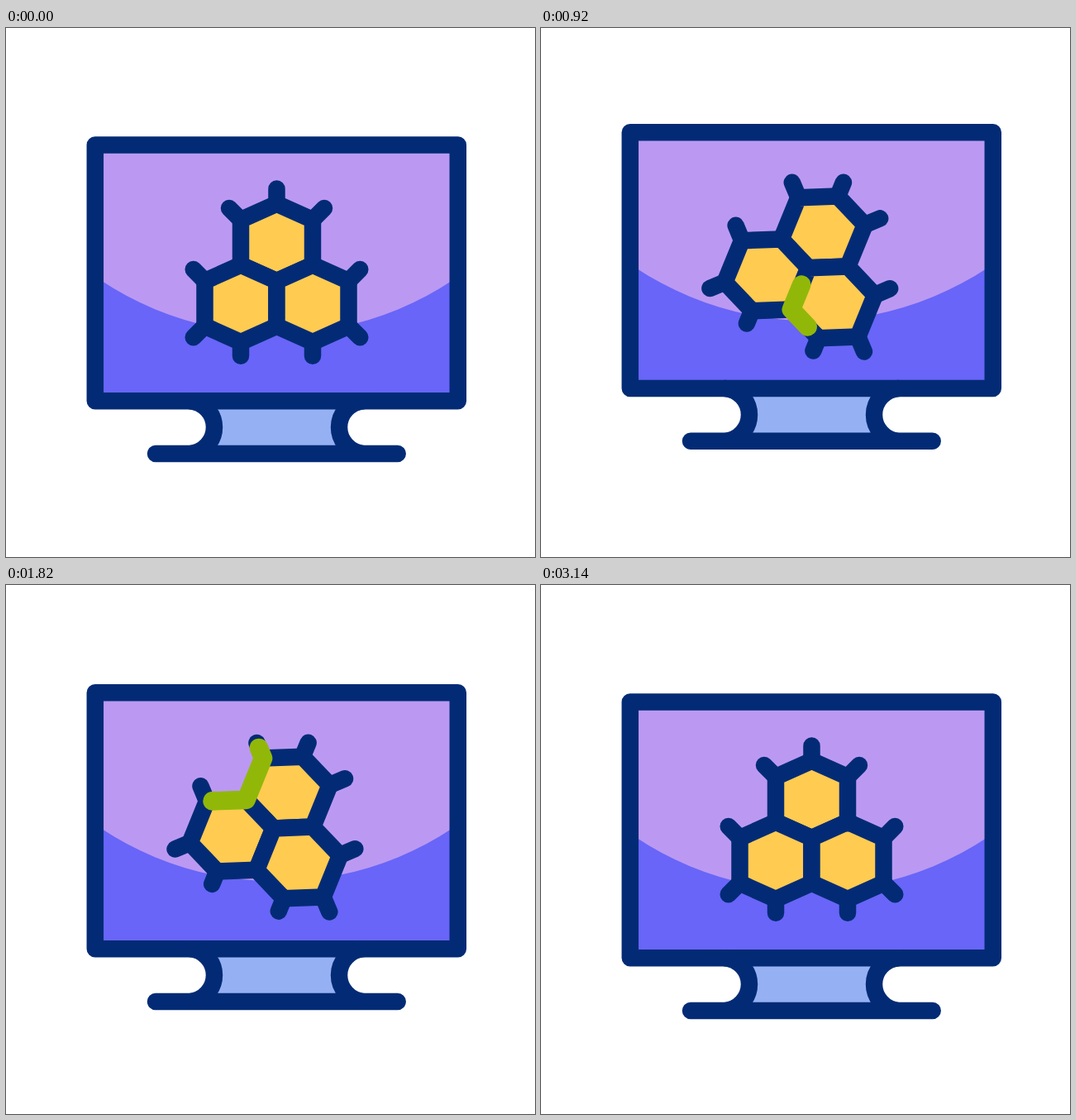
An HTML page that plays this animation: 640x640 px, repeating every 3.42 s.

```html
<!DOCTYPE html>
<html lang="en">
<head>
<meta charset="utf-8">
<title>Molecule monitor</title>
<style>
  html, body { margin: 0; height: 100%; overflow: hidden; background: #fff; }
  svg { display: block; width: 100%; height: 100%; }
  path, circle { fill: none; }
  .line { stroke: #032b75; stroke-width: 20.5; stroke-linecap: round; stroke-linejoin: round; }
  .cell { fill: #ffcb51; }
  .flash { stroke: #91b808; stroke-width: 22.6; stroke-linecap: round; stroke-linejoin: round; }
</style>
</head>
<body>
<svg viewBox="0 0 640 640">
  <clipPath id="screen"><path d="M108 141.5H546.7V451.2H108Z"/></clipPath>
  <g id="monitor">
    <path d="M222.5 451.2A32 32 0 0 1 222.5 515H432.5A32 32 0 0 1 432.5 451.2Z" style="fill:#95b1f4"/>
    <g clip-path="url(#screen)">
      <path d="M108 141H547V452H108Z" style="fill:#6865f8"/>
      <circle cx="327.5" cy="-15.5" r="385" style="fill:#bb99f2"/>
    </g>
    <path class="line" d="M107.8 141.4H546.8V451.2H107.8Z"/>
    <path class="line" d="M222.5 451.2A32 32 0 0 1 222.5 515M432.5 451.2A32 32 0 0 0 432.5 515M181 515H473.7"/>
    <g id="molecule"></g>
  </g>
</svg>
<script>
const LOOP = 3420, SWAY = 19.3, TILT = 25.4;
const monitor = document.getElementById('monitor');
const molecule = document.getElementById('molecule');

function add(tag, attrs) {
  const el = document.createElementNS('http://www.w3.org/2000/svg', tag);
  for (const key in attrs) el.setAttribute(key, attrs[key]);
  return molecule.appendChild(el);
}

// Three hexagonal cells and their outer bonds
for (const [x, y] of [[327.5, 259.4], [284, 333.4], [371, 333.4]]) {
  add('path', {
    class: 'line cell',
    d: `M${x} ${y - 46.8}l43.5 19.6v54.4l-43.5 19.6l-43.5 -19.6v-54.4Z`
  });
}
add('path', {
  class: 'line',
  d: 'M327.5 212.6V194.4M284 232L270 218M371 232L385 218' +
     'M240.5 306L226.7 292M414.5 306L428.3 292' +
     'M240.5 360.6L226.7 374.3M414.5 360.6L428.3 374.3' +
     'M284 380V396.7M371 380V396.7'
});
const joint = add('circle', { cx: 371, cy: 286.5, r: 11.9, style: 'fill:#032b75' });

// Each flash: route, head start and end, tail start and end (ms)
const flashes = [
  ['M371 286.6L327.5 306.2V360.6L371 380.2L414.5 360.6', 434, 1169, 665, 1390],
  ['M240.5 360.6L284 380.2L327.5 360.6V306.2L284 286.6', 963, 1574, 1142, 1760],
  ['M270 218L284 232.2V286.6L240.5 306.2V360.6L284 380.2V400.5', 1338, 2361, 1802, 2525],
  ['M371 286.6L414.5 306.2V360.6L371 380.2V400.5', 2234, 2950, 2447, 3140]
].map(([d, ...times]) => ({ el: add('path', { class: 'flash', d, pathLength: 1 }), times }));

const clamp = u => Math.min(1, Math.max(0, u));
const part = (t, from, to) => clamp((t - from) / (to - from));
const smooth = u => u * u * (3 - 2 * u);

function bezier(u, x1, y1, x2, y2) {
  const curve = (s, a, b) => 3 * s * (1 - s) ** 2 * a + 3 * s * s * (1 - s) * b + s ** 3;
  let lo = 0, hi = 1;
  for (let i = 0; i < 24; i++) {
    const mid = (lo + hi) / 2;
    if (curve(mid, x1, x2) < u) lo = mid; else hi = mid;
  }
  return curve(lo, y1, y2);
}

function lift(t) {
  const stops = [0, -SWAY, SWAY, -SWAY, 0];
  const pos = clamp((t - 200) / 2400) * 4;
  const i = Math.min(3, Math.floor(pos));
  return stops[i] + (stops[i + 1] - stops[i]) * smooth(pos - i);
}

function tilt(t) {
  return TILT * (t < 1400
    ? bezier(part(t, 200, 1400), .167, .167, .333, 1)
    : 1 - bezier(part(t, 1400, 2600), .577, 0, .889, 1));
}

function draw(now) {
  const t = now % LOOP;
  monitor.setAttribute('transform', `translate(0 ${lift(t)})`);
  molecule.setAttribute('transform', `rotate(${tilt(t)} 327.5 295.7)`);
  joint.style.display = t >= 2920 ? '' : 'none';
  for (const { el, times: [h0, h1, t0, t1] } of flashes) {
    const head = part(t, h0, h1), tail = part(t, t0, t1);
    el.style.display = head > tail ? '' : 'none';
    el.setAttribute('stroke-dasharray', `${head - tail} 2`);
    el.setAttribute('stroke-dashoffset', -tail);
  }
}

const begin = performance.now();
function tick() {
  draw(performance.now() - begin);
  requestAnimationFrame(tick);
}
tick();
</script>
</body>
</html>
```
